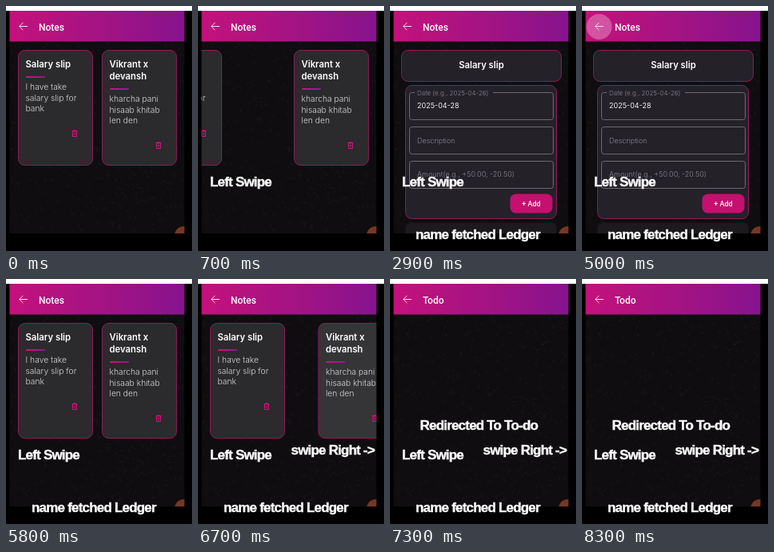
An HTML page that plays this animation: 233 px wide and 307 px high, repeating every 8400 ms.

```html
<!DOCTYPE html>
<html lang="en">
<head>
<meta charset="utf-8">
<title>Notes</title>
<style>
html, body { margin: 0; width: 100%; height: 100%; overflow: hidden; background: #000; }
svg { display: block; width: 233px; height: 307px; }
.bar { font: 500 12px Roboto, sans-serif; fill: #fff; }
.head { font: 600 11.3px Inter, "Noto Sans", sans-serif; fill: #fff; }
.body { font: 300 10.3px Inter, "Noto Sans", sans-serif; fill: #d6d5d8; }
.hint { font: 300 9px Inter, "Noto Sans", sans-serif; fill: #88868d; }
.small { font-size: 8px; }
.value { font: 400 9px Inter, "Noto Sans", sans-serif; fill: #f0eff2; }
.add { font: 500 9px Roboto, sans-serif; fill: #fff; }
.label { font: 700 17px "Liberation Sans", Arial, sans-serif; letter-spacing: -.8px; fill: #fff;
  stroke: #fff; stroke-width: .4px; }
</style>
</head>
<body>
<svg id="stage" viewBox="0 0 233 307" xmlns="http://www.w3.org/2000/svg">
  <defs>
    <linearGradient id="barFill"><stop stop-color="#c4127b"/><stop offset="1" stop-color="#86148c"/></linearGradient>
    <linearGradient id="ruleFill"><stop stop-color="#d3127a"/><stop offset="1" stop-color="#8c1a8c"/></linearGradient>
    <clipPath id="screen"><rect x="4.5" y="6" width="219" height="279"/></clipPath>
    <g id="bin" fill="none" stroke="#d3127a" stroke-width="1.1">
      <path d="M.6 1.6H7.4M2.8.7H5.2M1.6 2V8.5H6.4V2M3.2 4L4.8 6.4M4.8 4L3.2 6.4"/>
    </g>
  </defs>
  <rect width="233" height="307"/>
  <rect width="233" height="6" fill="#fff"/>
  <g clip-path="url(#screen)">
    <rect x="4" y="6" width="220" height="279" fill="#0f0d0f"/>
    <path id="doodles" fill="none" stroke="#1d191c" stroke-width=".8"/>
    <g id="notes"></g>
    <g id="ledger"></g>
    <rect x="4" y="6" width="220" height="38.5" fill="url(#barFill)"/>
    <circle id="ripple" cx="21.5" cy="26" fill="#fff"/>
    <path d="M27 25.5H16.8M21.4 20.8L16.7 25.5L21.4 30.2" fill="none" stroke="#f6d6ea" stroke-width="1"/>
    <text id="title" class="bar" x="41" y="30.5"></text>
    <circle cx="223" cy="288" r="12" fill="#783621"/>
  </g>
  <g id="labels"></g>
</svg>
<script>
const $ = id => document.getElementById(id);
const LOOP = 8400, STEP = 100;
const EDGE = "#8e1c58";

const text = (cls, x, y, s, more = "") => `<text class="${cls}" x="${x}" y="${y}" ${more}>${s}</text>`;
const box = (x, y, w, h, r, fill, stroke = "none") =>
  `<rect x="${x + .5}" y="${y + .5}" width="${w - 1}" height="${h - 1}" rx="${r}" fill="${fill}" stroke="${stroke}"/>`;

function card(id, x, head, body) {
  const rule = 73 + 15 * head.length;
  return `<g id="${id}">` + box(x, 55, 94, 145, 8, "#2b2a2d", EDGE) +
    `<rect id="${id}Glow" x="${x + 1}" y="56" width="92" height="143" rx="7.5" fill="#fff" opacity="0"/>` +
    head.map((s, i) => text("head", x + 9.5, 77 + 15 * i, s)).join("") +
    `<rect x="${x + 10}" y="${rule}" width="24" height="2" rx="1" fill="url(#ruleFill)"/>` +
    body.map((s, i) => text("body", x + 9.5, rule + 17 + 13.7 * i, s)).join("") +
    `<use href="#bin" x="${x + 67}" y="${rule + 67}"/></g>`;
}

const field = y => box(24, y, 181, 35, 3, "none", "#6c6971");

$("notes").innerHTML =
  card("first", 15, ["Salary slip"], ["I have take", "salary slip for", "bank"]) +
  card("second", 120, ["Vikrant x", "devansh"], ["kharcha pani", "hisaab khitab", "len den"]);

$("ledger").innerHTML =
  box(14, 55, 201, 40, 8, "#242129", EDGE) +
  text("head", 114.5, 78, "Salary slip", 'text-anchor="middle"') +
  box(19, 99, 190, 168, 8, "#242129", EDGE) +
  field(108) + field(151) + field(194) +
  '<rect x="31" y="106" width="98" height="5" fill="#242129"/>' +
  text("hint small", 34, 112, "Date (e.g., 2025-04-26)") +
  text("value", 34, 128, "2025-04-28") +
  text("hint", 34, 171.5, "Description") +
  text("hint", 34, 214, "Amount(e.g., +50.00, -20.50)") +
  box(150, 235, 54, 25, 7, "#c5106f") +
  text("add", 177, 251, "+ Add", 'text-anchor="middle"') +
  box(19, 271, 190, 30, 6, "#1c1a1d");

// Each caption stays from its time until the loop restarts.
const captions = [
  [400, 15, 226, "Left Swipe"],
  [1400, 32, 292, "name fetched Ledger"],
  [6300, 116.5, 220, "swipe Right -&gt;"],
  [7300, 37.5, 189, "Redirected To To-do"]
];
$("labels").innerHTML = captions.map(([, x, y, s]) => text("label", x, y, s)).join("");

let seed = 7;
const rand = () => (seed = seed * 16807 % 2147483647) / 2147483647;
let d = "";
for (let i = 0; i < 420; i++) {
  const x = 4 + rand() * 220, y = 45 + rand() * 240;
  const bend = () => (rand() * 10 - 5).toFixed(1);
  d += `M${x.toFixed(1)} ${y.toFixed(1)}q${bend()} ${bend()} ${bend()} ${bend()}`;
}
$("doodles").setAttribute("d", d);

const ramp = (t, a, b) => Math.min(1, Math.max(0, (t - a) / (b - a)));
const ease = p => p * p * (3 - 2 * p);
const fade = (id, v) => $(id).setAttribute("opacity", v);
const slide = (id, x) => $(id).setAttribute("transform", `translate(${x} 0)`);

function draw(now) {
  const t = Math.floor(now % LOOP / STEP) * STEP;
  const open = ramp(t, 800, 1100) - ramp(t, 5100, 5400);
  const todo = ramp(t, 7000, 7200);
  const right = ease(ramp(t, 6400, 6900));
  slide("first", t < 5000 ? -79 * ease(ramp(t, 200, 700)) : 0);
  slide("second", 47 * right);
  fade("secondGlow", .07 * right);
  fade("notes", (1 - open) * (1 - todo));
  fade("ledger", open);
  $("title").textContent = todo > .5 ? "Todo" : "Notes";
  $("ripple").setAttribute("r", 8 + 8 * ramp(t, 4400, 4700));
  fade("ripple", .28 * (ramp(t, 4300, 4600) - ramp(t, 5100, 5400)));
  captions.forEach(([start], i) => $("labels").children[i].setAttribute("visibility", t >= start ? "visible" : "hidden"));
}

const begin = performance.now();
function tick() {
  draw(performance.now() - begin);
  requestAnimationFrame(tick);
}
tick();
</script>
</body>
</html>
```
